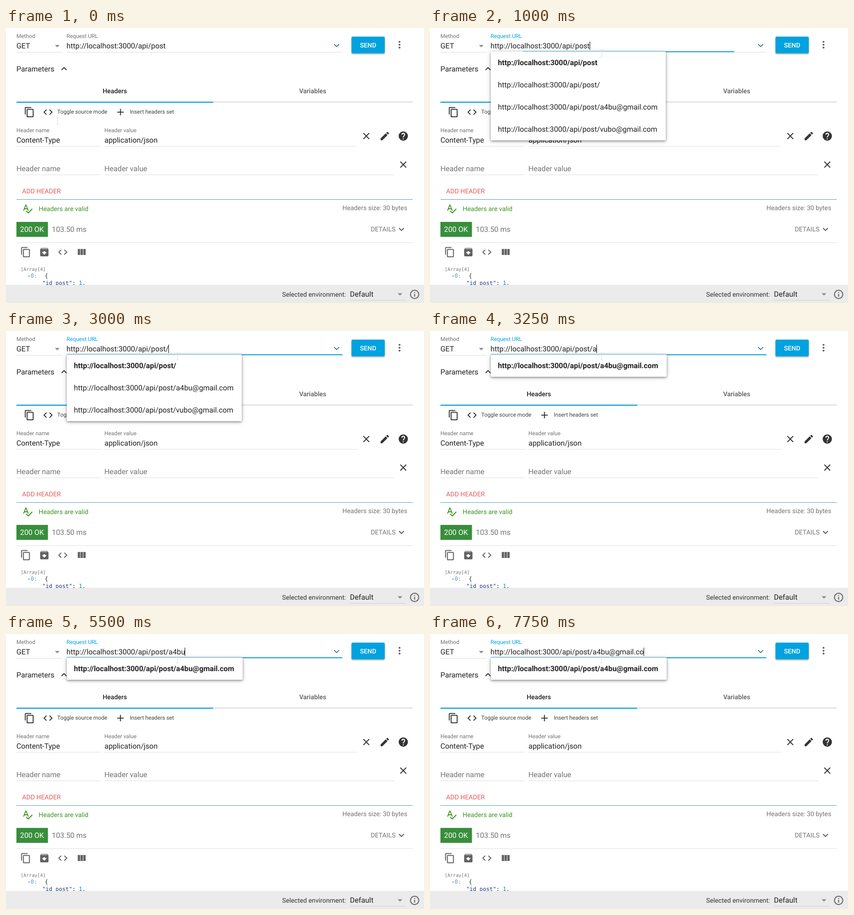
An HTML page for the animation above (8000 ms loop, 922 by 607 pixels).

```html
<!DOCTYPE html>
<html lang="en">
<head>
<meta charset="utf-8">
<title>Request panel</title>
<style>
  html, body { margin: 0; width: 100%; height: 100%; overflow: hidden; background: #fff; }
  svg { display: block; }
  text { font: 16.25px Roboto, sans-serif; fill: #212121; text-rendering: geometricPrecision; white-space: pre; }
  .s { font-size: 12.2px; }
  .m { font-size: 14.25px; }
  .w5 { font-weight: 500; }
  .bold { font-weight: 700; }
  .grey { fill: #737373; }
  .white { fill: #fff; }
  .code { font: 12.2px "DejaVu Sans Mono", monospace; }
  .rule { fill: #dcdcdc; }
  #menu rect { fill: #fff; filter: drop-shadow(0 2px 2px rgba(0,0,0,.3)) drop-shadow(0 1px 4px rgba(0,0,0,.25)); }
  #send { fill: #00a2df; filter: drop-shadow(0 2px 1.5px rgba(0,0,0,.3)); }
</style>
</head>
<body>
<svg id="stage" width="922" height="607" viewBox="0 0 922 607">
  <text class="s grey" x="23" y="22.3">Method</text>
  <text x="23" y="45.2">GET</text>
  <text class="s" id="urlLabel" x="133.5" y="22.3">Request URL</text>
  <text id="url" x="133.5" y="45.2"></text>
  <rect class="rule" x="23" y="53" width="102" height="1"/>
  <rect class="rule" x="134" y="53" width="608" height="1"/>
  <rect id="focus" y="51.3" height="2" fill="#00a2df"/>
  <rect id="send" x="762" y="19" width="73.5" height="37" rx="3"/>
  <text class="m w5 white" x="798.7" y="43" text-anchor="middle">SEND</text>
  <g fill="#616161"><circle cx="868" cy="30.5" r="2.1"/><circle cx="868" cy="37" r="2.1"/><circle cx="868" cy="43.3" r="2.1"/></g>

  <text x="23" y="95.8">Parameters</text>
  <text class="m w5" x="240" y="144.2" text-anchor="middle">Headers</text>
  <text class="m w5" x="676.5" y="144.2" text-anchor="middle" style="fill:#5c5c5c">Variables</text>
  <rect x="23" y="162" width="874" height="2.5" fill="#e0e0e0"/>
  <rect x="23" y="162.8" width="434" height="2.2" fill="#00a2df"/>
  <text class="s" x="113" y="189.2" style="fill:#424242">Toggle source mode</text>
  <text class="s" x="273" y="189.2" style="fill:#424242">Insert headers set</text>

  <text class="s grey" x="23" y="230.3">Header name</text>
  <text x="23" y="252.5">Content-Type</text>
  <text class="s grey" x="217" y="230.3">Header value</text>
  <text x="217.3" y="252.5">application/json</text>
  <rect class="rule" x="23" y="260.5" width="186" height="1"/>
  <rect class="rule" x="217" y="260.5" width="557" height="1"/>
  <text class="grey" x="23" y="316">Header name</text>
  <text class="grey" x="217" y="316">Header value</text>
  <rect class="rule" x="23" y="323.5" width="186" height="1"/>
  <rect class="rule" x="217" y="323.5" width="639" height="1"/>
  <text class="m" x="35.5" y="364.8" style="fill:#e65a5a">ADD HEADER</text>
  <rect x="23" y="378" width="874" height="1" fill="#4b9dba"/>
  <text class="m" x="72" y="404.3" style="fill:#3c9421">Headers are valid</text>
  <text class="m grey" x="885" y="402.3" text-anchor="end">Headers size: 30 bytes</text>

  <rect x="23" y="428" width="69.5" height="33" fill="#388e3c"/>
  <text class="white" x="31" y="450">200 OK</text>
  <text class="grey" x="101" y="450">103.50 ms</text>
  <text class="m grey" x="804.5" y="449.2">DETAILS</text>
  <rect class="rule" x="23" y="473.3" width="874" height="1"/>
  <text class="code grey" x="32.5" y="536" style="font-size:10.15px">[Array[4]</text>
  <text class="code" x="47" y="551">-<tspan fill="#5a96c8">0:</tspan></text>
  <text class="code" x="85.5" y="551">{</text>
  <text class="code" x="80" y="566.8"><tspan fill="#183691">"id_post"</tspan>: <tspan fill="#0086b3">1</tspan>,</text>

  <rect y="567" width="922" height="40" fill="#ebebeb"/>
  <text class="m" x="609" y="592.8" style="fill:#333">Selected environment:</text>
  <text x="758.5" y="593">Default</text>
  <rect x="758" y="600.5" width="123" height="1" fill="#cfcfcf"/>

  <g id="icons"></g>
  <rect id="caret" y="30" width="1.2" height="18.5" fill="#212121"/>
  <g id="menu"></g>
  <path id="beam" d="M-4-8h3l1 1 1-1h3M0-7V7M-4 8h3l1-1 1 1h3" fill="none" stroke="#dedede"/>
  <path id="arrow" d="M.5.5v16l3.7-3.5 2.4 5.3 2.3-1-2.4-5.2h5z" fill="#fff" stroke="#000" stroke-width=".9"/>
</svg>
<script>
const $ = id => document.getElementById(id);

function add(parent, tag, attrs, text = '') {
  const el = document.createElementNS('http://www.w3.org/2000/svg', tag);
  for (const key in attrs) el.setAttribute(key, attrs[key]);
  el.textContent = text;
  parent.append(el);
}

// Icon outlines on a 24-unit grid
const shapes = {
  copy: 'M16 1H4c-1.1 0-2 .9-2 2v14h2V3h12V1zm3 4H8c-1.1 0-2 .9-2 2v14c0 1.1.9 2 2 2h11c1.1 0 2-.9 2-2V7c0-1.1-.9-2-2-2zm0 16H8V7h11v14z',
  code: 'M9.4 16.6L4.8 12l4.6-4.6L8 6l-6 6 6 6 1.4-1.4zm5.2 0l4.6-4.6-4.6-4.6L16 6l6 6-6 6-1.4-1.4z',
  plus: 'M19 13h-6v6h-2v-6H5v-2h6V5h2v6h6v2z',
  close: 'M19 6.4L17.6 5 12 10.6 6.4 5 5 6.4l5.6 5.6L5 17.6 6.4 19l5.6-5.6 5.6 5.6 1.4-1.4-5.6-5.6z',
  edit: 'M3 17.25V21h3.75L17.81 9.94l-3.75-3.75zM20.71 7.04c.39-.39.39-1.02 0-1.41l-2.34-2.34c-.39-.39-1.02-.39-1.41 0l-1.83 1.83 3.75 3.75z',
  help: 'M12 2a10 10 0 1 0 0 20 10 10 0 0 0 0-20zm1 17h-2v-2h2zm2.07-7.75l-.9.92C13.45 12.9 13 13.5 13 15h-2v-.5c0-1.1.45-2.1 1.17-2.83l1.24-1.26c.37-.36.59-.86.59-1.41a2 2 0 0 0-4 0H8a4 4 0 0 1 8 0c0 .88-.36 1.68-.93 2.25z',
  check: 'M12.45 16h2.09L9.43 3H7.57L2.46 16h2.09l1.12-3h5.64zm-6.02-5L8.5 5.48 10.57 11zm15.16.59l-8.09 8.09L9.83 16l-1.41 1.41 5.09 5.09L23 13z',
  archive: 'M20.54 5.23l-1.39-1.68C18.88 3.21 18.47 3 18 3H6c-.47 0-.88.21-1.16.55L3.46 5.23C3.17 5.57 3 6.02 3 6.5V19c0 1.1.9 2 2 2h14c1.1 0 2-.9 2-2V6.5c0-.48-.17-.93-.46-1.27zM12 17.5L6.5 12H10v-2h4v2h3.5zM5.12 5l.81-1h12l.94 1z',
  columns: 'M10 18h5V5h-5zM4 18h5V5H4zM16 5v13h5V5z',
  info: 'M11 17h2v-6h-2zM12 2a10 10 0 1 0 0 20 10 10 0 0 0 0-20zm0 18a8 8 0 1 1 0-16 8 8 0 0 1 0 16zM11 9h2V7h-2z',
  down: 'M16.59 8.59L12 13.17 7.41 8.59 6 10l6 6 6-6z',
  up: 'M12 8l-6 6 1.41 1.41L12 10.83l4.59 4.58L18 14z',
  drop: 'M7 10l5 5 5-5z'
};

function icon(name, x, y, fill = '#333') {
  add($('icons'), 'path', {
    d: shapes[name], fill, 'fill-rule': 'evenodd',
    transform: `translate(${x} ${y}) scale(1.02) translate(-12 -12)`
  });
}

icon('drop', 113, 39.5, '#858585');
icon('down', 729.3, 38.5, '#4b7f99');
icon('up', 128, 90);
icon('copy', 51.7, 185.7);
icon('code', 92.7, 185.7);
icon('plus', 252.5, 185.7);
icon('close', 794.7, 238.5);
icon('edit', 835.5, 238.5);
icon('help', 876.3, 238.5);
icon('close', 876.3, 301.5);
icon('check', 47.5, 399, '#3c9421');
icon('down', 872.3, 444.3, '#616161');
icon('copy', 43.5, 494.8, '#616161');
icon('archive', 84.5, 494.8, '#616161');
icon('code', 125.3, 494.8, '#616161');
icon('columns', 166.5, 494.8, '#616161');
icon('drop', 869, 587.5, '#858585');
icon('info', 901.3, 588, '#616161');

const LOOP = 8000, FOCUS = 1000;
const base = 'http://localhost:3000/api/post';
const tail = '/a4bu@gmail.com';
const keyTimes = [2000, 3250, 3750, 4000, 4500, 6000, 6500, 6750, 6750, 7000, 7250, 7500, 7500, 7750];
const history = [base, base + '/', base + tail, base + '/vubo@gmail.com'];

function show(id, on) {
  $(id).style.display = on ? '' : 'none';
}

function place(id, x, y) {
  $(id).setAttribute('transform', `translate(${x} ${y})`);
}

function drawMenu(items) {
  const menu = $('menu');
  menu.replaceChildren();
  if (!items.length) return;
  add(menu, 'rect', { x: 134, y: 52, width: items.length > 1 ? 386 : 388, height: 49 * items.length, rx: 1.5 });
  items.forEach((item, i) =>
    add(menu, 'text', { x: 149.7, y: 81.7 + 49 * i, class: i ? '' : 'bold' }, item));
}

function drawPointer(t) {
  const moving = t >= 250 && t < 750;
  show('arrow', moving);
  show('beam', t < 250 || t >= FOCUS);
  place('arrow', ...(t < 500 ? [356, 65] : [367, 53]));
  place('beam', ...(t < 250 ? [113.5, 205] : [378.5, 56]));
}

function draw(t) {
  const focused = t >= FOCUS;
  const pressed = keyTimes.filter(k => k <= t);
  const value = base + tail.slice(0, pressed.length);
  $('url').textContent = value;
  $('urlLabel').style.fill = focused ? '#00a2df' : '#737373';

  // The caret blinks every half second, restarting at each key
  const sinceKey = t - (pressed.at(-1) ?? FOCUS);
  show('caret', focused && sinceKey % 1000 < 500);
  $('caret').setAttribute('x', Math.floor(133.5 + $('url').getComputedTextLength()));

  // The focus line grows outward from the middle
  const half = !focused ? 0 : t < 1250 ? 233 : 304;
  $('focus').setAttribute('x', 438 - half);
  $('focus').setAttribute('width', 2 * half);

  drawMenu(focused ? history.filter(h => h.startsWith(value)) : []);
  drawPointer(t);
}

const start = performance.now();
function tick() {
  draw((performance.now() - start) % LOOP);
  requestAnimationFrame(tick);
}
tick();
</script>
</body>
</html>
```
